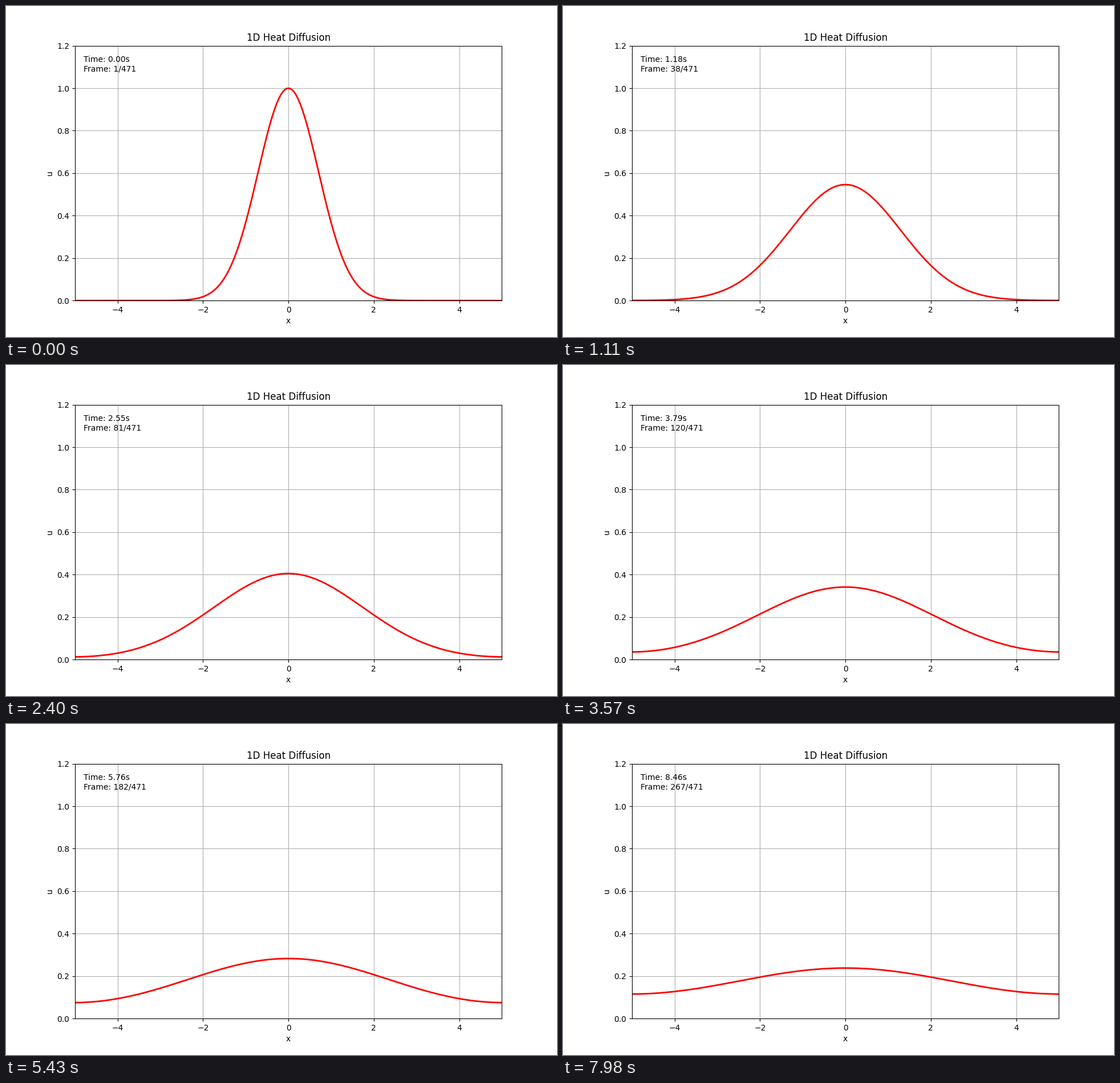
A matplotlib script that plays this animation: 966 by 580 pixels, repeating every 8 s.

```python
import numpy as np
import matplotlib.pyplot as plt
from matplotlib.animation import FuncAnimation

STEPS = 267
TOTAL = 471
LOOP_MS = 8000

D = 0.5
x = np.linspace(-5, 5, 200)
dx = x[1] - x[0]
period = len(x) * dx
dt = 14 * 0.45 * dx**2 / D  # simulated time per step


def heat(t):
    """Spreading Gaussian on a periodic line, as a sum of its images."""
    s = 1 + 4 * D * t
    return sum(np.exp(-(x - n * period) ** 2 / s) for n in range(-3, 4)) / np.sqrt(s)


plt.rcParams["font.family"] = "DejaVu Sans"
fig, ax = plt.subplots(figsize=(9.66, 5.8), dpi=100)
ax.set_xlim(-5, 5)
ax.set_ylim(0, 1.2)
ax.set_xlabel("x")
ax.set_ylabel("u")
ax.set_title("1D Heat Diffusion")
ax.grid(True)

line, = ax.plot(x, heat(0), "r-", lw=2)
label = ax.text(0.02, 0.9, "", transform=ax.transAxes)


def update(i):
    t = i * dt
    line.set_ydata(heat(t))
    label.set_text(f"Time: {t:.2f}s\nFrame: {i + 1}/{TOTAL}")
    return line, label


anim = FuncAnimation(fig, update, frames=STEPS, interval=LOOP_MS / STEPS,
                     repeat=True, repeat_delay=0)
plt.show()
```
